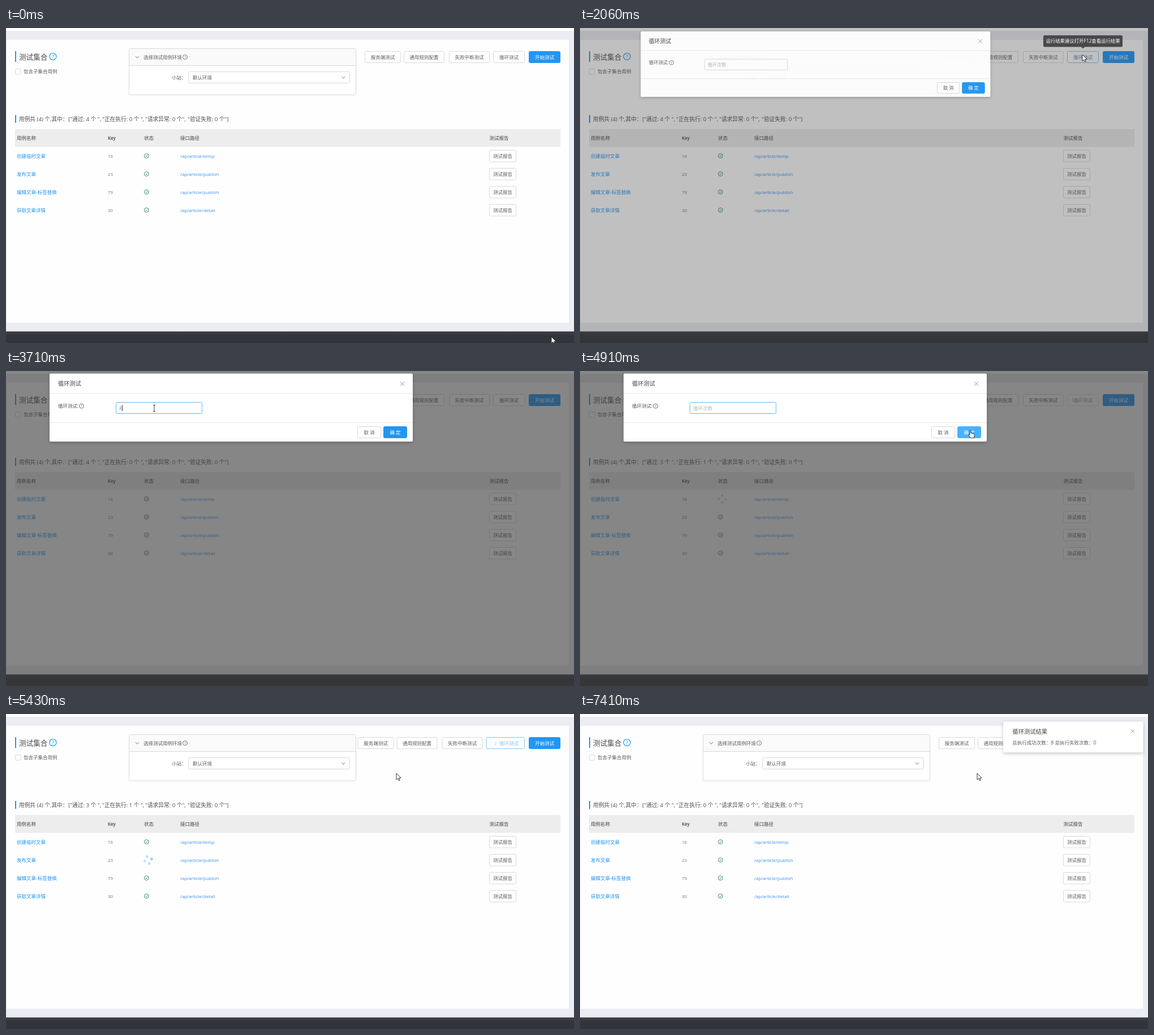
An HTML page for the animation above (8 s loop, 1004x558 px).

```html
<!DOCTYPE html>
<html lang="zh-CN">
<head>
<meta charset="utf-8">
<style>
  html, body { margin: 0; width: 100%; height: 100%; overflow: hidden; background: #ecedf2; }
  svg { display: block; width: 1004px; height: 558px; font-family: 'Open Sans', 'Noto Sans CJK SC', 'Noto Sans CJK', sans-serif; }
</style>
</head>
<body>
<svg id="stage" viewBox="0 0 1004 558"></svg>
<script>
const LOOP = 8000, STEP = 66.13;
const BLUE = '#2196f3', LIGHT = '#40a9ff', GREY = '#5c5c5c', LINE = '#d9d9d9', GREEN = '#258066';
const stage = document.getElementById('stage');

// ---- timing helpers
const ramp = (t, start, length) => Math.min(1, Math.max(0, (t - start) / length));
const mix = (a, b, p) => a + (b - a) * p;
const mixColor = (a, b, p) => {
  const part = (c, i) => parseInt(c.slice(i, i + 2), 16);
  return `rgb(${[1, 3, 5].map(i => Math.round(mix(part(a, i), part(b, i), p)))})`;
};
const bezier = (x1, y1, x2, y2) => p => {
  const at = (a, b, s) => 3 * a * s * (1 - s) ** 2 + 3 * b * s * s * (1 - s) + s ** 3;
  let lo = 0, hi = 1;
  for (let i = 0; i < 20; i++) {
    const mid = (lo + hi) / 2;
    if (at(x1, x2, mid) < p) lo = mid; else hi = mid;
  }
  return at(y1, y2, hi);
};
const circOut = bezier(.08, .82, .17, 1);
const circInOut = bezier(.78, .14, .15, .86);
const inOut = bezier(.645, .045, .355, 1);
const quintOut = bezier(.23, 1, .32, 1);

// ---- drawing helpers
const rect = (x, y, w, h, fill, stroke = 'none', r = 0, more = '') =>
  `<rect x="${x}" y="${y}" width="${w}" height="${h}" rx="${r}" fill="${fill}" stroke="${stroke}" ${more}/>`;
const text = (x, cy, label, size = 8.5, fill = GREY, more = '') =>
  `<text x="${x}" y="${cy + size * .37}" font-size="${size}" fill="${fill}" ${more}>${label}</text>`;
const line = (d, color, width = 1, more = '') =>
  `<path d="${d}" fill="none" stroke="${color}" stroke-width="${width}" ${more}/>`;
const group = (content, attrs) => `<g ${attrs}>${content}</g>`;
const button = (x, y, w, h, label, fill = '#fff', stroke = LINE, color = GREY) =>
  rect(x, y, w, h, fill, stroke, 2) + text(x + w / 2, y + h / 2, label, 8.5, color, 'text-anchor="middle"');
const help = (x, y, r, color) =>
  `<circle cx="${x}" cy="${y}" r="${r}" fill="none" stroke="${color}" stroke-width="${r / 5}"/>` +
  text(x, y, '?', r * 1.5, color, 'text-anchor="middle"');
const chevron = (x, y) => line(`M${x - 3} ${y - 1.5}l3 3.2 3-3.2`, '#777');
const cross = (x, y, r) => line(`M${x - r} ${y - r}l${2 * r} ${2 * r}m0 ${-2 * r}l${-2 * r} ${2 * r}`, '#888', .9);

// ---- page
const rows = [
  ['创建临时文章', 16, 'temp'], ['发布文章', 23, 'publish'],
  ['编辑文章-标签替换', 79, 'publish'], ['获取文章详情', 30, 'detail'],
];
const rowY = i => 227 + 32 * i;

const page =
  `<defs>
    <linearGradient id="bar" x2="0" y2="1"><stop stop-color="#3b3f44"/><stop offset=".4" stop-color="#31343a"/></linearGradient>
    <filter id="shadow" x="-10%" y="-20%" width="120%" height="150%"><feDropShadow dx="0" dy="2" stdDeviation="3" flood-opacity=".22"/></filter>
  </defs>` +
  rect(0, 0, 1004, 558, '#ecedf2') + rect(0, 0, 1004, 5, '#fff') +
  rect(1, 21, 994, 501, '#fefefe') + rect(0, 537.5, 1004, 21, 'url(#bar)') +
  rect(16, 41, 2, 19, BLUE) + text(23, 51, '测试集合', 12.6, '#4c4c4c') + help(83, 50.5, 6, BLUE) +
  rect(16.5, 72.5, 9.5, 9.5, '#fff', LINE, 1) + text(31, 76.5, '包含子集合用例') +
  rect(217.5, 36.5, 401, 82, '#fff', LINE, 2) + rect(218, 37, 400, 29, '#fafafa') +
  line('M218 66.5h400', LINE) + chevron(232, 51.5) + text(243, 51.5, '选择测试用例环境') + help(316.5, 51.5, 4, '#555') +
  text(293, 87.5, '小站：') + rect(322.5, 77.5, 285, 20, '#fff', LINE, 2) +
  text(330, 87.5, '默认环境') + chevron(596, 87.5) +
  rect(16, 154, 2, 14, BLUE) + rect(16, 179, 964, 31.5, '#ededed') +
  [[19, '用例名称'], [244, '状态'], [308, '接口路径'], [854.5, '测试报告']]
    .map(([x, label]) => text(x, 195, label, 8.5, '#444', 'font-weight="500"')).join('') +
  text(180, 195, 'Key', 8, '#444', 'font-weight="600"') +
  rows.map(([name, key, path], i) => {
    const y = rowY(i);
    return text(19, y, name, 8.5, BLUE) + text(180, y, key, 8, '#777') +
      text(308, y, '/ap/article/' + path, 8, '#3490f2') + button(854.5, y - 10.5, 47, 20.5, '测试报告');
  }).join('');

// ---- test run: four cases, twice
const RUN = 4890, CASE = 294, DONE = RUN + 8 * CASE;

const statusIcon = y =>
  `<circle cx="248.3" cy="${y - .5}" r="3.9" fill="none" stroke="${GREEN}" stroke-width=".9"/>` +
  line(`M246.4 ${y - .7}l1.5 1.6 2.4-2.8`, GREEN, .9);

const spinner = (y, age) => {
  const dots = [[-1, -1], [1, -1], [1, 1], [-1, 1]].map(([dx, dy], i) => {
    const phase = Math.max(0, age - 400 * i) / 1000 % 2;
    const opacity = .3 + .7 * (phase < 1 ? phase : 2 - phase);
    return `<circle cx="${dx * 4.4}" cy="${dy * 4.4}" r="2.3" fill="${BLUE}" opacity="${opacity}"/>`;
  }).join('');
  return group(dots, `transform="translate(251.3 ${y - .3}) rotate(${45 + age * .3})"`);
};

function tableState(t) {
  const running = t >= RUN && t < DONE;
  const turn = Math.floor((t - RUN) / CASE);
  const summary = [[23, '用例共 (4) 个,其中：'], [110, `["通过: ${running ? 3 : 4} 个 ",`],
    [170, `"正在执行: ${running ? 1 : 0} 个 ",`], [246, '"请求异常: 0 个",'], [321, '"验证失败: 0 个"]']];
  return summary.map(([x, s]) => text(x, 161, s, 9.7, '#505050')).join('') +
    rows.map((_, i) => running && turn % 4 === i
      ? spinner(rowY(i), t - RUN - turn * CASE) : statusIcon(rowY(i))).join('');
}

function toolbar(t) {
  const grow = 12.5 * (inOut(ramp(t, RUN, 300)) - inOut(ramp(t, DONE, 160)));
  const running = t >= RUN && t < DONE;
  const active = running ? ramp(t, RUN, 200) : ramp(t, 1000, 250) - ramp(t, 1960, 200);
  const left = 861.5 - grow;
  let loop = button(left, 41.5, 55 + grow, 20, '', '#fff', mixColor(LINE, LIGHT, active)) +
    text(889, 51.5, '循环测试', 8.5, mixColor(GREY, LIGHT, active), 'text-anchor="middle"');
  if (running) loop += line('M0 -4A4 4 0 0 0 -4 0', LIGHT, 1,
    `transform="translate(${left + 13} 51.5) rotate(${(t - RUN) * .36 - 45})"`);
  return [[634.5, 63, '服务端测试'], [703.5, 71, '通用规则配置'], [783.5, 71, '失败中断测试']]
    .map(([x, w, label]) => button(x - grow, 41.5, w, 20, label)).join('') +
    group(loop, `opacity="${running ? .65 : 1}"`) +
    button(924.5, 41.5, 55, 20, '开始测试', BLUE, BLUE, '#fff');
}

// ---- modal, tooltip, notice
const OPEN = 1898, CLOSE = 4898;

function modal(t, overOk) {
  if (t < OPEN || t > CLOSE + 300) return '';
  const zoom = t < CLOSE ? circOut(ramp(t, OPEN, 300)) : 1 - circInOut(ramp(t, CLOSE, 262));
  const shade = .6 * (t < CLOSE ? ramp(t, OPEN, 300) : 1 - ramp(t, CLOSE, 262));
  const typed = t >= 3700 && t < 4880, focused = t >= 2910 && t < 4880;
  const caretOn = focused && (t - (typed ? 3700 : 2912)) % 1060 < 530;
  const okColor = overOk ? '#49b1ff' : BLUE;
  const box =
    rect(77, 4.5, 642, 120.5, '#fff', 'none', 2, 'filter="url(#shadow)"') +
    text(92, 22.5, '循环测试', 10.2, '#444') + cross(700.5, 22.5, 3.5) +
    line('M77 39.5h642M77 91.5h642', '#e8e8e8') +
    text(92, 62, '循环测试:', 8.5) + help(133.5, 62, 4, '#555') +
    rect(194.5, 55.5, 152, 20, '#fff', t > 2830 ? '#69b8fa' : LINE, 2) +
    (typed ? text(200, 65.5, '2', 8) : text(200, 65.5, '循环次数', 8.5, '#b5b5b5')) +
    (caretOn ? rect(typed ? 205 : 200, 60, 1, 11, '#333') : '') +
    button(621.5, 98.5, 41, 20, '取 消') + button(667.5, 98.5, 41, 20, '确 定', okColor, okColor, '#fff');
  return rect(0, 0, 1004, 558, '#373737', 'none', 0, `opacity="${shade}"`) +
    group(box, `opacity="${zoom}" transform="translate(886 47) scale(${zoom}) translate(-886 -47)"`);
}

function tooltip(t) {
  const show = ramp(t, 1130, 130) - ramp(t, 2070, 100);
  if (show <= 0) return '';
  const scale = .8 + .2 * show;
  return group(rect(819, 13, 140, 20.5, '#484848', 'none', 2) + '<path d="M885.5 33h7l-3.5 3.5z" fill="#484848"/>' +
    text(889, 23.3, '运行结果建议打开F12查看运行结果', 8.4, '#fff', 'text-anchor="middle"'),
    `opacity="${show}" transform="translate(889 37) scale(${scale}) translate(-889 -37)"`);
}

function notice(t) {
  if (t < DONE) return '';
  const p = quintOut(ramp(t, DONE + 10, 200));
  return group(rect(748, 13.5, 247, 54.5, '#fff', 'none', 2, 'filter="url(#shadow)"') +
    text(764, 31.5, '循环测试结果', 10.3, '#444') + cross(976.5, 30.5, 3) +
    text(764, 51, '总执行成功次数：8 总执行失败次数：0', 8.5),
    `opacity="${p}" transform="translate(${256 * (1 - p)} 0)"`);
}

// ---- pointer: [start, end, x, y] for each move
const moves = [
  [20, 880, 819, 83], [880, 1140, 888, 47], [2230, 2980, 262, 66],
  [3880, 4660, 690, 105], [5680, 5900, 702, 105],
];
function pointerAt(t) {
  let x = 964, y = 547;
  for (const [start, end, toX, toY] of moves) {
    const p = 1 - (1 - ramp(t, start, end - start)) ** 2;
    x = mix(x, toX, p);
    y = mix(y, toY, p);
  }
  return [x, y];
}
const shapes = {
  arrow: '<path d="M0 0v11.5l2.7-2.5 1.8 4 1.8-.8-1.8-3.9h3.7z" fill="#fff" stroke="#222" stroke-width=".9"/>',
  hand: '<path d="M-1 1q1-1.6 2 0v4l5 1.2q1.4.5 1.2 2l-.7 5.3h-6l-4-5q.2-1.6 1.6-.8l.9.8z" fill="#fff" stroke="#222" stroke-width=".9"/>',
  beam: '<path d="M-2-5.5h4M0-5.5v11M-2 5.5h4" fill="none" stroke="#333" stroke-width=".9"/>',
};

function scene(t) {
  const [x, y] = pointerAt(t);
  const inside = (left, top, right, bottom) => x > left && x < right && y > top && y < bottom;
  const isOpen = t >= OPEN && t <= CLOSE;
  const overOk = t < CLOSE + 60 && t >= OPEN && inside(667, 98, 709, 119);
  let shape = 'arrow';
  if (overOk || t < OPEN && inside(861, 41, 917, 62)) shape = 'hand';
  if (isOpen && inside(194, 55, 347, 76)) shape = 'beam';
  return tableState(t) + toolbar(t) + modal(t, overOk) + tooltip(t) + notice(t) +
    group(shapes[shape], `transform="translate(${x} ${y})"`);
}

let shown = null;
function draw(now) {
  const step = Math.floor((now % LOOP - 62) / STEP);
  if (step !== shown) {
    shown = step;
    stage.innerHTML = page + scene(Math.max(0, 70 + step * STEP));
  }
  requestAnimationFrame(draw);
}
draw(0);
</script>
</body>
</html>
```
